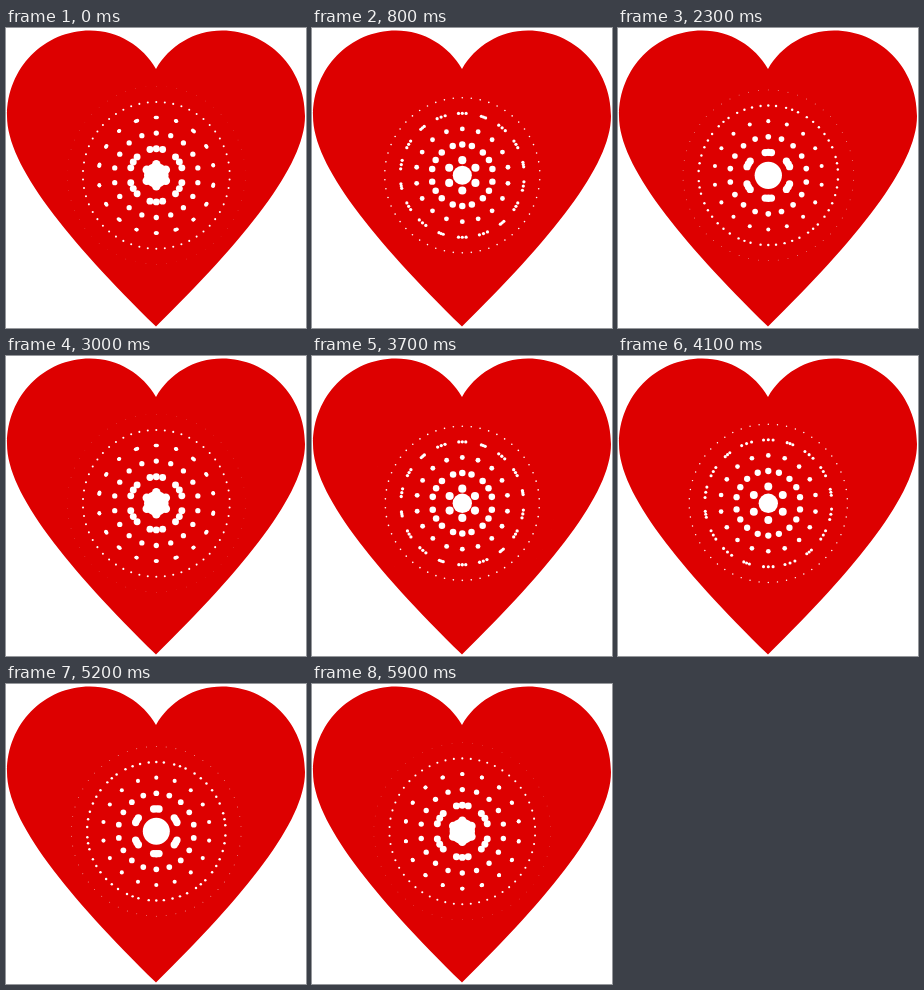
An HTML page with a canvas for the animation above (6000 ms loop, 300 by 300 pixels).

```html
<!DOCTYPE html>
<html lang="en">
<head>
<meta charset="utf-8">
<title>Heart</title>
<style>
  html, body { margin: 0; width: 100%; height: 100%; overflow: hidden; background: #fff; }
  canvas { display: block; width: 300px; height: 300px; }
</style>
</head>
<body>
<canvas id="stage" width="300" height="300"></canvas>
<script>
const ctx = document.getElementById('stage').getContext('2d');
const CENTER = { x: 150.3, y: 147.3 };
const PERIOD = 3000;   // time for each ring to reach the next one's place
const STEP = 100;      // the picture changes ten times a second
const SPACING = 15.6;  // distance between rings
const FIRST = 11;      // radius of the innermost visible ring at the start of a period
const SPLIT_EASE = [2.4, 2, 1]; // the three siblings split at different paces

const heart = new Path2D(
  'M150 41C137 18 112 2.5 84 2.5C38 2.5 1 40 1 88C1 138 62 212 150 298.5' +
  'C238 212 299 138 299 88C299 40 262 2.5 216 2.5C188 2.5 163 18 150 41Z');

const clamp = v => Math.min(1, Math.max(0, v));
const easeOut = (u, power) => 1 - (1 - clamp(u)) ** power;

function disc(x, y, radius) {
  ctx.beginPath();
  ctx.arc(x, y, radius, 0, 2 * Math.PI);
  ctx.fill();
}

// Angle in degrees, clockwise from the top.
function dot(r, degrees, size) {
  const a = degrees * Math.PI / 180;
  disc(CENTER.x + r * Math.sin(a), CENTER.y - r * Math.cos(a), size);
}

// Six dots, each splitting in three and later in three again.
function ring(r) {
  const size = 0.052 * (93 - r);
  if (r < 0 || size <= 0) return;
  const spread = 20 * easeOut((r - 19.3) / 16.5, 2);
  for (let arm = 0; arm < 6; arm++) {
    for (let i = -1; i <= 1; i++) {
      const angle = arm * 60 + i * spread;
      const fan = 20 / 3 * easeOut((r - 56.8) / 16.5, SPLIT_EASE[i + 1]);
      for (let j = -1; j <= 1; j++) {
        if (j && !fan || i && !spread) continue;
        dot(r, angle + j * fan, size);
      }
    }
  }
}

function draw(time) {
  const phase = Math.floor(time / STEP) * STEP % PERIOD / PERIOD;
  ctx.clearRect(0, 0, 300, 300);
  ctx.fillStyle = '#d00';
  ctx.fill(heart);
  ctx.fillStyle = '#fff';
  disc(CENTER.x, CENTER.y, 11.6 + 2.1 * Math.cos(2 * Math.PI * (phase - 0.8)));
  for (let n = -1; n < 6; n++) ring(FIRST + SPACING * (n + phase));
}

let start;
function tick(now) {
  start ??= now;
  draw(now - start);
  requestAnimationFrame(tick);
}
draw(0);
requestAnimationFrame(tick);
</script>
</body>
</html>
```
